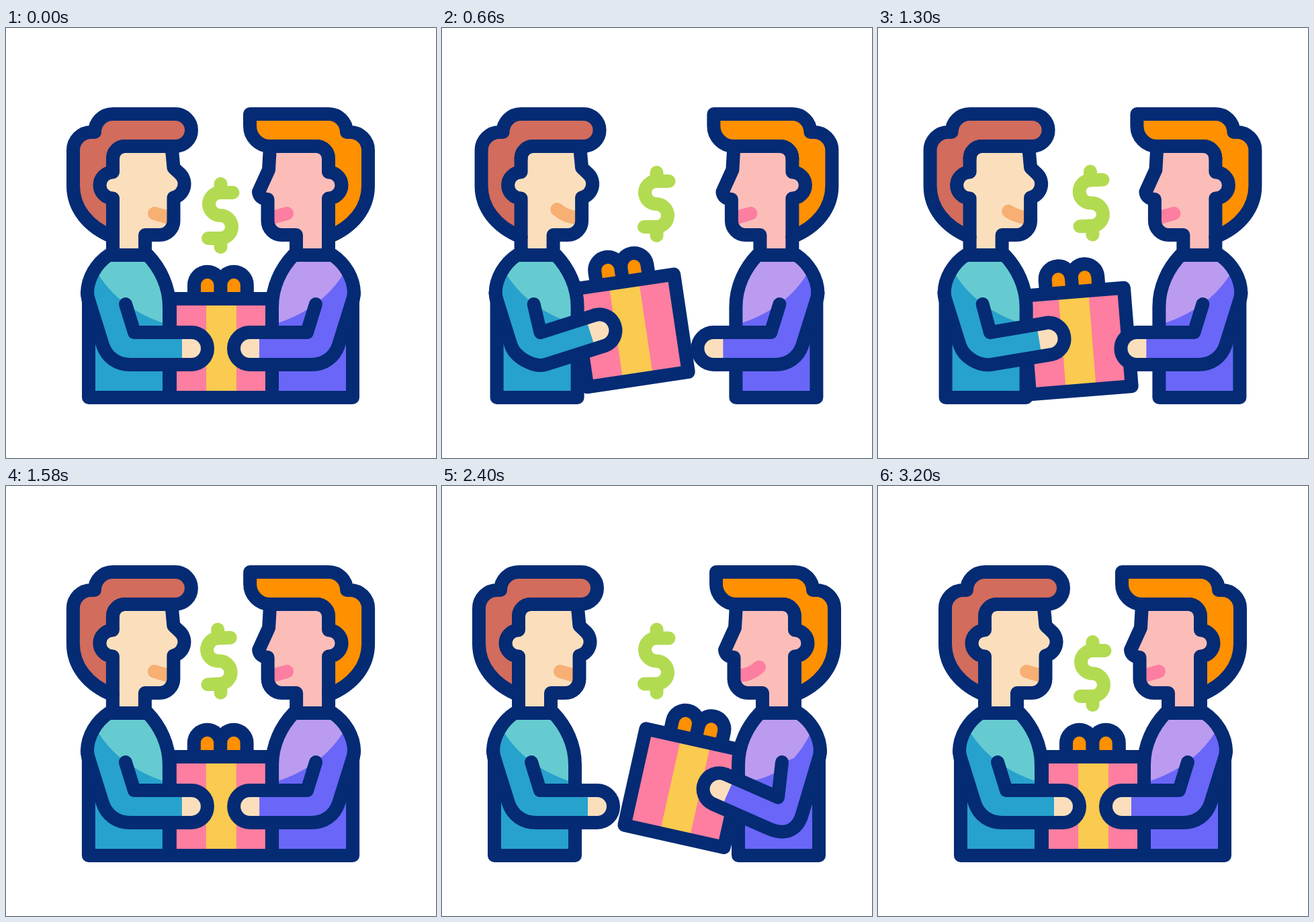
An HTML page with a canvas for the animation above (3220 ms loop, 640 px wide and 640 px high).

```html
<!DOCTYPE html>
<html lang="en">
<head>
<meta charset="utf-8">
<title>Gift exchange</title>
<style>
html, body { margin: 0; width: 100%; height: 100%; overflow: hidden; background: #fff; }
canvas { display: block; width: 640px; height: 640px; }
</style>
</head>
<body>
<canvas id="stage"></canvas>
<script>
const LOOP = 3220;
const NAVY = '#042b74', PINK = '#fd7ea0', ORANGE = '#ff9000', CREAM = '#fbdfbc';
const canvas = document.getElementById('stage');
const ctx = canvas.getContext('2d');
const dpr = window.devicePixelRatio || 1;
canvas.width = canvas.height = 640 * dpr;

const HAIR_BACK = 'M159 311C122 296 100 268 100 235V182a27 27 0 0 1 27 -27H132c0 -15 12 -27 27 -27';
const HAIR_FRONT = 'H177a18 18 0 0 0 -18 18';
const NECK_EAR = 'M159 338V253.5a19.5 19.5 0 0 1 0 -39V194a18 18 0 0 1 18 -18';
const CHIN = 'V287a21 21 0 0 1 -21 21H207V338';
const BODY = new Path2D('M123 550V408L121 395C121 372 135 350 153 338H211C230 358 243 385 243 415V550Z');
const BOW = new Path2D('M280 403V382.5a19.7 19.7 0 0 1 39.4 0V403M319.4 403V382.5a19.7 19.7 0 0 1 39.4 0V403');
const DOLLAR = new Path2D('M337.5 245H319a17 17 0 0 0 0 34a17 17 0 0 1 0 34H301M319.5 232V245M319.5 313V326');

// Both people are drawn facing right; the second one is mirrored.
// reach: how far the forearm turns and the elbow sinks when holding the gift
const LEFT = {
  hair: new Path2D(HAIR_BACK + 'H252a24 24 0 0 1 0 48' + HAIR_FRONT),
  face: new Path2D(NECK_EAR + 'H246.5L249.5 208L258 216A21 21 0 0 1 249.5 252.5' + CHIN),
  hairColor: '#d26c5c', skin: CREAM, mouth: '#f7af73', dark: '#27a2cc', light: '#66cbd0',
  reach: { angle: 19.2, drop: 0 }
};
const RIGHT = {
  hair: new Path2D(HAIR_BACK + 'H276V146a30 30 0 0 1 -30 30' + HAIR_FRONT),
  face: new Path2D(NECK_EAR + 'H246L248 211L263 244Q262 254 249.5 255' + CHIN),
  hairColor: ORANGE, skin: '#fcbdb9', mouth: PINK, dark: '#6a66f8', light: '#bb9bf0',
  reach: { angle: 23.7, drop: 10 }
};

const rad = d => d * Math.PI / 180;
const mix = (a, b, k) => a + (b - a) * k;
const clamp = x => Math.max(0, Math.min(1, x));
const smooth = (t, a, b) => {
  const x = clamp((t - a) / (b - a));
  return x * x * (3 - 2 * x);
};

function fill(path, color) {
  ctx.fillStyle = color;
  ctx.fill(path);
}

function stroke(path, color = NAVY, width = 20) {
  ctx.strokeStyle = color;
  ctx.lineWidth = width;
  ctx.stroke(path);
}

// How far apart the people stand, 0 to 1
function spread(t) {
  if (t < 1000) return smooth(t, 0, 800);
  if (t < 1600) return 1 - smooth(t, 1000, 1600);
  if (t < 2600) {
    const x = clamp((t - 1600) / 800);
    return 0.65 * x * (1 - x) * (1 - x) + x * x * (3 - 2 * x);
  }
  return 1 - smooth(t, 2600, 3200);
}

function drawHead(who, smile) {
  fill(who.hair, who.hairColor);
  fill(who.face, who.skin);
  const mouth = new Path2D();
  mouth.moveTo(221 - 9 * smile, 276 - 6.5 * smile);
  mouth.quadraticCurveTo(231 - 6 * smile, 279 + 2.5 * smile, 242, 282);
  ctx.save();
  ctx.clip(who.face);
  stroke(mouth, who.mouth);
  ctx.restore();
  stroke(who.hair);
  stroke(who.face);
}

function drawBody(who, lift) {
  const drop = who.reach.drop * lift;
  const light = new Path2D();
  light.moveTo(128, 350);
  light.quadraticCurveTo(160, 416 + 2 * drop, 240, 441);
  light.lineTo(260, 330);
  light.lineTo(120, 330);
  fill(BODY, who.dark);
  ctx.save();
  ctx.clip(BODY);
  fill(light, who.light);
  ctx.restore();
  stroke(BODY);
}

function drawArm(who, lift) {
  const full = rad(-who.reach.angle), c = Math.cos(full), s = Math.sin(full);
  const drop = who.reach.drop * lift, a = full * lift;
  // Points slide straight from the rest pose to the fully turned pose
  const turn = (x, y) => [
    mix(x, 190 + (x - 190) * c - (y - 463) * s, lift) - 0.3 * drop,
    mix(y, 463 + (x - 190) * s + (y - 463) * c, lift) + drop
  ];
  const tip = path => {
    path.lineTo(...turn(276, 453));
    path.arc(...turn(276, 477), 24, a - Math.PI / 2, a + Math.PI / 2);
  };
  const arm = new Path2D();
  arm.moveTo(178, 411);
  arm.lineTo(...turn(191, 453));
  tip(arm);
  arm.lineTo(...turn(185, 501));
  arm.bezierCurveTo(...turn(165 - 1.2 * drop, 501), 150 + 0.3 * drop, 490 + 1.8 * drop,
    144 + 0.35 * drop, 472 + 1.5 * drop);
  arm.lineTo(124, 408);
  arm.quadraticCurveTo(121, 400, 121, 393);
  fill(arm, who.dark);

  const hand = new Path2D();
  hand.moveTo(...turn(262, 453));
  tip(hand);
  hand.lineTo(...turn(262, 501));
  fill(hand, CREAM);
  stroke(arm);
}

function drawPerson(who, shift, lift, flip) {
  ctx.save();
  if (flip) {
    ctx.translate(639, 0);
    ctx.scale(-1, 1);
  }
  ctx.translate(-shift, 0);
  drawHead(who, lift);
  drawBody(who, lift);
  drawArm(who, lift);
  ctx.restore();
}

function drawGift(l, r) {
  const p = l + r;
  const side = r > 0 ? 1 : -1;
  const dx = side * (41.6 * p + 13 * p * (1 - p));
  const dy = -(12.3 * l + 17.4 * l * l + 2.7 * r + 24.2 * r * r);
  ctx.save();
  ctx.translate(320 + dx, 476.5 + dy);
  ctx.rotate(rad(12.6 * r - 9.2 * l));
  ctx.translate(-320, -476.5);
  fill(BOW, ORANGE);
  stroke(BOW);
  ctx.fillStyle = PINK;
  ctx.fillRect(244, 403, 152, 147);
  ctx.fillStyle = '#fbca50';
  ctx.fillRect(298, 403, 45, 147);
  const box = new Path2D();
  box.rect(244, 403, 152, 147);
  stroke(box);
  ctx.restore();
}

function drawDollar(t) {
  const rise = 18.5 * (smooth(t, 0, 800) - smooth(t, 2400, 3200));
  const tilt = 2.7 * (smooth(t, 800, 1500) - smooth(t, 1500, 2400));
  ctx.save();
  ctx.translate(319.5, 326 - rise);
  ctx.rotate(rad(-tilt));
  ctx.translate(-319.5, -326);
  stroke(DOLLAR, '#b2db52');
  ctx.restore();
}

function draw(t) {
  const p = spread(t);
  const first = t < 1600;
  const liftLeft = first ? p : 0;
  const liftRight = first ? 0 : smooth(t, 1600, 2400) - smooth(t, 2600, 3200);
  ctx.setTransform(dpr, 0, 0, dpr, 0, 0);
  ctx.fillStyle = '#fff';
  ctx.fillRect(0, 0, 640, 640);
  ctx.lineCap = ctx.lineJoin = 'round';
  drawDollar(t);
  drawGift(first ? p : 0, first ? 0 : p);
  drawPerson(LEFT, 45 * p, liftLeft, false);
  drawPerson(RIGHT, 45 * p, liftRight, true);
}

const start = performance.now();
function tick() {
  draw((performance.now() - start) % LOOP);
  requestAnimationFrame(tick);
}
tick();
</script>
</body>
</html>
```
